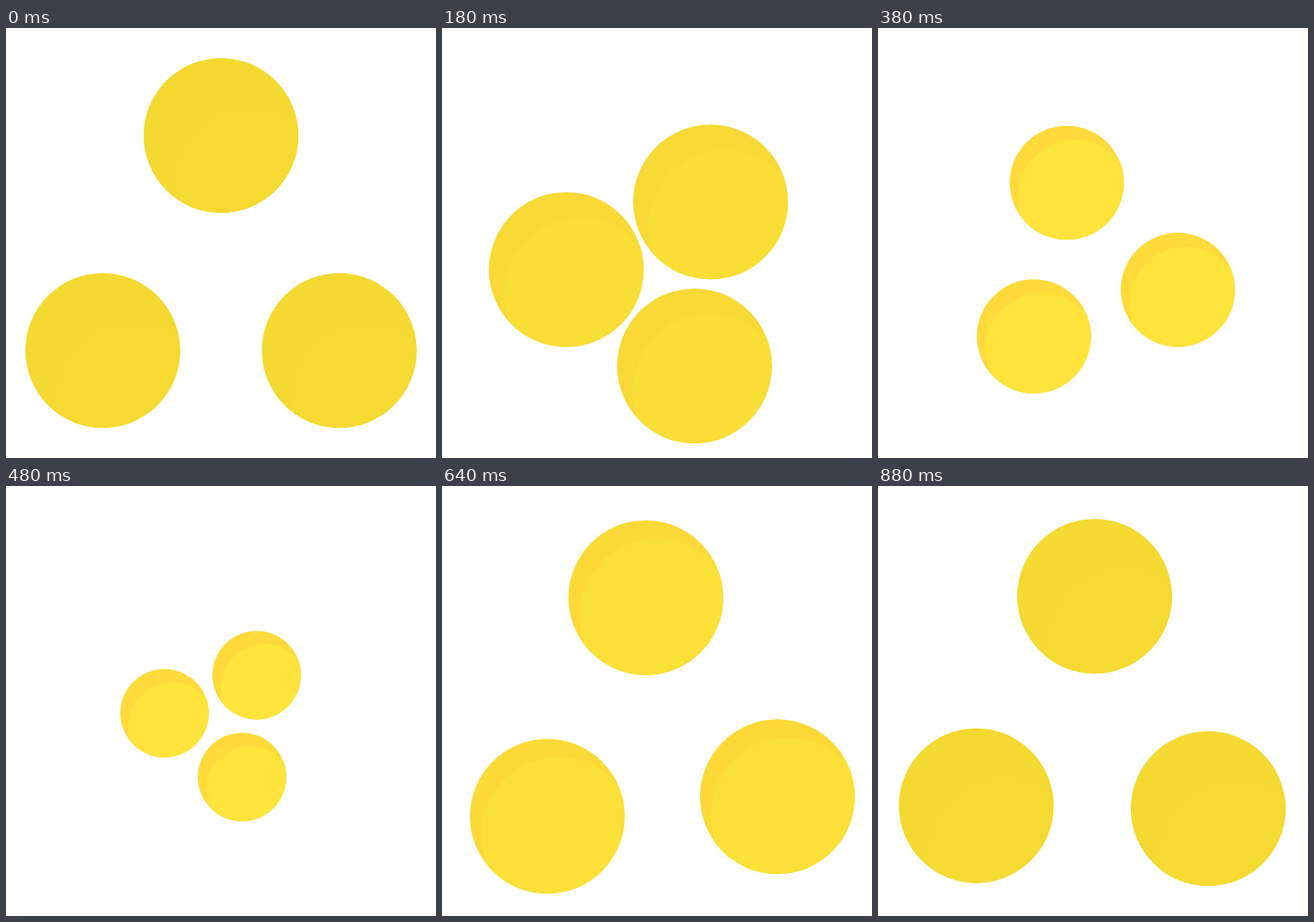
An HTML page with a canvas that plays this animation: 500x500 px, repeating every 900 ms.

```html
<!DOCTYPE html>
<html lang="en">
<head>
<meta charset="utf-8">
<title>Three circles</title>
<style>
  html, body { margin: 0; width: 100%; height: 100%; overflow: hidden; background: #fff; }
  canvas { display: block; width: 500px; height: 500px; }
</style>
</head>
<body>
<canvas id="stage" width="500" height="500"></canvas>
<script>
const ctx = document.getElementById('stage').getContext('2d');
const LOOP = 900, LEG = 300, STEP = 20, RADIUS = 90, MIN_SCALE = 0.522;
const corners = [[250, 125], [112.5, 375], [387.5, 375]];
const light = [[245, 218, 50], [254, 228, 59]];
const dark = [[244, 217, 49], [255, 218, 59]];

const ease = x => x * x * (3 - 2 * x);
const mix = (a, b, p) => a + (b - a) * p;
const there = t => ease(1 - Math.abs(t - 0.5) * 2);
const rgb = ([a, b], p) => `rgb(${a.map((v, i) => Math.round(mix(v, b[i], p))).join()})`;

// Smooth path through four stops, one leg at a time, sampled by length.
function makeLeg(ball, leg) {
  const stop = k => corners[(ball + Math.min(3, Math.max(0, k))) % 3];
  const [p, a, b, n] = [-1, 0, 1, 2].map(d => stop(leg + d));
  const c1 = a.map((v, i) => v + (b[i] - p[i]) / 6);
  const c2 = b.map((v, i) => v - (n[i] - a[i]) / 6);
  const points = [];
  let length = 0;
  for (let j = 0; j <= 200; j++) {
    const s = j / 200, r = 1 - s;
    const [x, y] = a.map((v, i) =>
      r * r * r * v + 3 * s * r * r * c1[i] + 3 * s * s * r * c2[i] + s * s * s * b[i]);
    if (j) length += Math.hypot(x - points[j - 1].x, y - points[j - 1].y);
    points.push({ x, y, length });
  }
  return points;
}

function pointAt(points, part) {
  const goal = part * points[points.length - 1].length;
  const j = Math.max(1, points.findIndex(q => q.length >= goal));
  const a = points[j - 1], b = points[j];
  const p = (goal - a.length) / (b.length - a.length);
  return [mix(a.x, b.x, p), mix(a.y, b.y, p)];
}

const paths = [0, 1, 2].map(ball => [0, 1, 2].map(leg => makeLeg(ball, leg)));

function disc(x, y, r) {
  ctx.beginPath();
  ctx.arc(x, y, r, 0, Math.PI * 2);
}

function drawBall(x, y, r, glow) {
  const shade = 57 / (1 + 2.7 * glow);
  disc(x, y, r);
  ctx.fillStyle = rgb(dark, glow);
  ctx.fill();
  ctx.save();
  ctx.clip();
  disc(x + shade * 0.6, y + shade, r);
  ctx.fillStyle = rgb(light, glow);
  ctx.fill();
  ctx.restore();
}

function draw(now) {
  const t = Math.floor((now % LOOP) / STEP) * STEP;
  const leg = Math.floor(t / LEG), part = (t % LEG) / LEG;
  const scale = leg === 1 ? mix(1, MIN_SCALE, there(part)) : 1;
  const glow = there(t / LOOP);
  ctx.fillStyle = '#fff';
  ctx.fillRect(0, 0, 500, 500);
  for (const ball of [1, 2, 0]) {
    const [x, y] = pointAt(paths[ball][leg], ease(part));
    drawBall(mix(250, x, scale), mix(250, y, scale), RADIUS * scale, glow);
  }
}

function tick() {
  draw(performance.now());
  requestAnimationFrame(tick);
}
tick();
</script>
</body>
</html>
```
